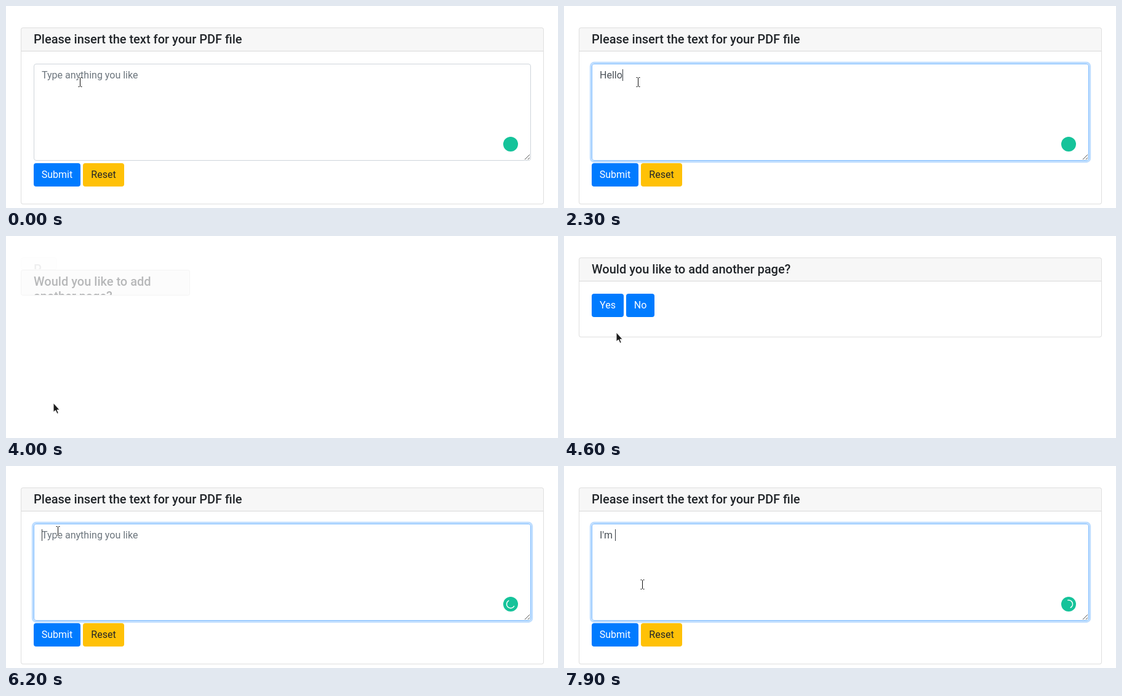
These frames come from a looping animation (897x329 px, 8000 ms). An HTML page:

```html
<!DOCTYPE html>
<html lang="en">
<head>
<meta charset="utf-8">
<title>PDF text form</title>
<style>
* { box-sizing: border-box; }
html, body { margin: 0; width: 100%; height: 100%; overflow: hidden; background: #fff; }
body { position: relative; font: 400 16px/24px Roboto, sans-serif; color: #212529; cursor: default; }
#page { position: absolute; left: 24px; top: 35px; width: 850px; }
.card { border: 1px solid rgba(0,0,0,.125); border-radius: 4px; background: #fff; overflow: hidden; overflow-wrap: break-word; }
.head { padding: 6px 20px 7px; font: 500 20px/24px Roboto, sans-serif; background: rgba(0,0,0,.03); border-bottom: 1px solid rgba(0,0,0,.125); }
.body { padding: 20px; }
.field { position: relative; height: 158px; margin-bottom: 4px; padding: 6px 12px; border: 1px solid #ced4da; border-radius: 4px; color: #495057; white-space: pre-wrap; }
.hint { color: #6c757d; }
.caret { position: absolute; top: 8px; width: 1px; height: 19px; background: #343a40; }
.grip { position: absolute; right: 0; bottom: 0; }
.row { display: flex; gap: 4px; }
.btn { flex: none; height: 38px; padding: 7px 0; border-radius: 4px; text-align: center; color: #fff; background: #007bff; }
#reset { width: 67px; color: #212529; background: #ffc107; }
#over { position: absolute; left: 0; top: 0; }
</style>
</head>
<body>
<div id="page">
  <div class="card" id="form">
    <div class="head">Please insert the text for your PDF file</div>
    <div class="body">
      <div class="field" id="field"><span id="typed"></span><i class="caret" id="caret"></i><span class="hint" id="hint">Type anything you like</span><svg class="grip" width="10" height="10"><path d="M1 9L9 1M6 9L9 6" stroke="#555" fill="none"/></svg></div>
      <div class="row"><div class="btn" id="submit" style="width:76px">Submit</div><div class="btn" id="reset">Reset</div></div>
    </div>
  </div>
  <div class="card" id="ask">
    <div class="head">Would you like to add another page?</div>
    <div class="body row"><div class="btn" id="yes" style="width:52px">Yes</div><div class="btn" style="width:46px">No</div></div>
  </div>
</div>
<svg id="over" width="897" height="329">
  <g id="badge">
    <circle cx="820" cy="225" r="12" fill="#15c39a"/>
    <path id="spin" fill="none" stroke="#fff" stroke-width="1.5" stroke-linecap="round"/>
  </g>
  <g id="mouse" stroke-linejoin="round">
    <g id="beam" fill="none">
      <path d="M-3 -7.5H3M.5 -7V7M-3 7.5H4" stroke="#fff" stroke-width="3" opacity=".8"/>
      <path d="M-2.5 -7.5H-.5M1.5 -7.5H3.5M.5 -7V7M-2.5 7.5H-.5M1.5 7.5H3.5" stroke="#111"/>
    </g>
    <path id="arrow" d="M0 0V15L3.5 12L6 17.5L8.3 16.5L6 11.2H10.3Z" fill="#1c1c1c" stroke="#fff"/>
    <path id="hand" d="M1 -1C2 -1 2.5 -.3 2.5 .6V4.6L7.5 5.6C9.4 6 10 7 10 8.6V11L8.6 14.5H1.5L-3.6 9.4C-4.5 8.2 -3.2 6.8 -2 7.4L-.5 8.4V.6C-.5 -.3 0 -1 1 -1Z" fill="#2e2e2e" stroke="#fff"/>
  </g>
</svg>
<script>
const LOOP = 8000, FADE = 200;
const $ = id => document.getElementById(id);
const clamp = v => Math.max(0, Math.min(1, v));
const ramp = (t, start, len) => clamp((t - start) / len);
const swing = p => .5 - Math.cos(p * Math.PI) / 2;
const mix = (a, b, k) => `rgb(${a.map((v, i) => Math.round(v + (b[i] - v) * k))})`;
const within = (t, a, b) => t >= a && t < b;
const last = (list, t) => list.filter(e => e[0] <= t).pop();

const typing = [[0, ''], [900, 'H'], [1200, 'He'], [1600, 'Hel'], [1700, 'Hell'], [2300, 'Hello'],
  [5900, ''], [6800, 'I'], [7200, "I'"], [7400, "I'm"], [7600, "I'm "]];
const caretOff = [[0, 300], [700, 900], [2900, 3300], [3740, 6050], [6600, 6800]];
const path = [[0, 120, 124], [3250, 120, 124], [3600, 88, 243], [3740, 77, 272], [4350, 77, 272],
  [4600, 85, 157], [5050, 85, 157], [5260, 85.5, 106], [5900, 85.5, 106], [6200, 84, 106],
  [6250, 84, 106], [6500, 127, 193], [LOOP, 127, 193]];
const shapes = [[0, 'beam'], [3550, 'hand'], [3880, 'arrow'], [5180, 'hand'], [5930, 'arrow'], [6080, 'beam']];

function size(card, k, height) {
  card.style.display = k > 0 ? '' : 'none';
  card.style.width = 850 * k + 'px';
  card.style.height = height * k + 'px';
  card.style.opacity = k;
}

function button(el, hover, press) {
  el.style.background = press > 0 ? mix([0, 105, 217], [0, 98, 204], press)
    : mix([0, 123, 255], [0, 105, 217], hover);
  el.style.boxShadow = `0 0 0 3.2px rgba(38,143,255,${press * .5})`;
}

function spinner(t) {
  const on = within(t, 6150, 6800) || t >= 7400;
  $('spin').style.display = on ? '' : 'none';
  if (!on) return;
  const mid = 135 + .3324 * (t - 6200), half = t < 7000 ? 105 : 80;
  const at = deg => {
    const a = deg * Math.PI / 180;
    return `${820 + 6.5 * Math.cos(a)} ${225 + 6.5 * Math.sin(a)}`;
  };
  $('spin').setAttribute('d', `M${at(mid - half)}A6.5 6.5 0 ${half > 90 ? 1 : 0} 1 ${at(mid + half)}`);
}

function pointer(t) {
  const i = path.findIndex(p => p[0] > t), a = path[i - 1], b = path[i];
  const k = ramp(t, a[0], b[0] - a[0]);
  const x = Math.round(a[1] + (b[1] - a[1]) * k), y = Math.round(a[2] + (b[2] - a[2]) * k);
  $('mouse').setAttribute('transform', `translate(${x} ${y})`);
  const shape = last(shapes, t)[1];
  for (const id of ['beam', 'arrow', 'hand']) $(id).style.display = id === shape ? '' : 'none';
}

function draw(t) {
  size($('form'), t < 5000 ? 1 - swing(ramp(t, 3835, FADE)) : swing(ramp(t, 5955, FADE)), 288);
  size($('ask'), t < 5000 ? swing(ramp(t, 3924, FADE)) : 1 - swing(ramp(t, 5865, FADE)), 130);

  const text = last(typing, t)[1];
  $('typed').textContent = text;
  $('hint').style.display = text ? 'none' : '';
  $('caret').style.display = caretOff.some(([a, b]) => within(t, a, b)) ? 'none' : '';

  const focus = t < 3740 ? ramp(t, 270, 150) : t < 5000 ? 1 - ramp(t, 3740, 150) : ramp(t, 6040, 150);
  $('field').style.borderColor = mix([206, 212, 218], [128, 189, 255], focus);
  $('field').style.boxShadow = `0 0 0 3.2px rgba(0,123,255,${focus * .25})`;

  const first = t < 5000 ? 1 : 0;
  button($('submit'), first * ramp(t, 3640, 100), first * ramp(t, 3740, 80));
  button($('yes'), ramp(t, 5180, 100), ramp(t, 5650, 120));

  $('badge').style.display = within(t, 3835, 6150) ? 'none' : '';
  spinner(t);
  pointer(t);
}

const start = performance.now();
function tick() {
  draw((performance.now() - start) % LOOP);
  requestAnimationFrame(tick);
}
tick();
</script>
</body>
</html>
```
